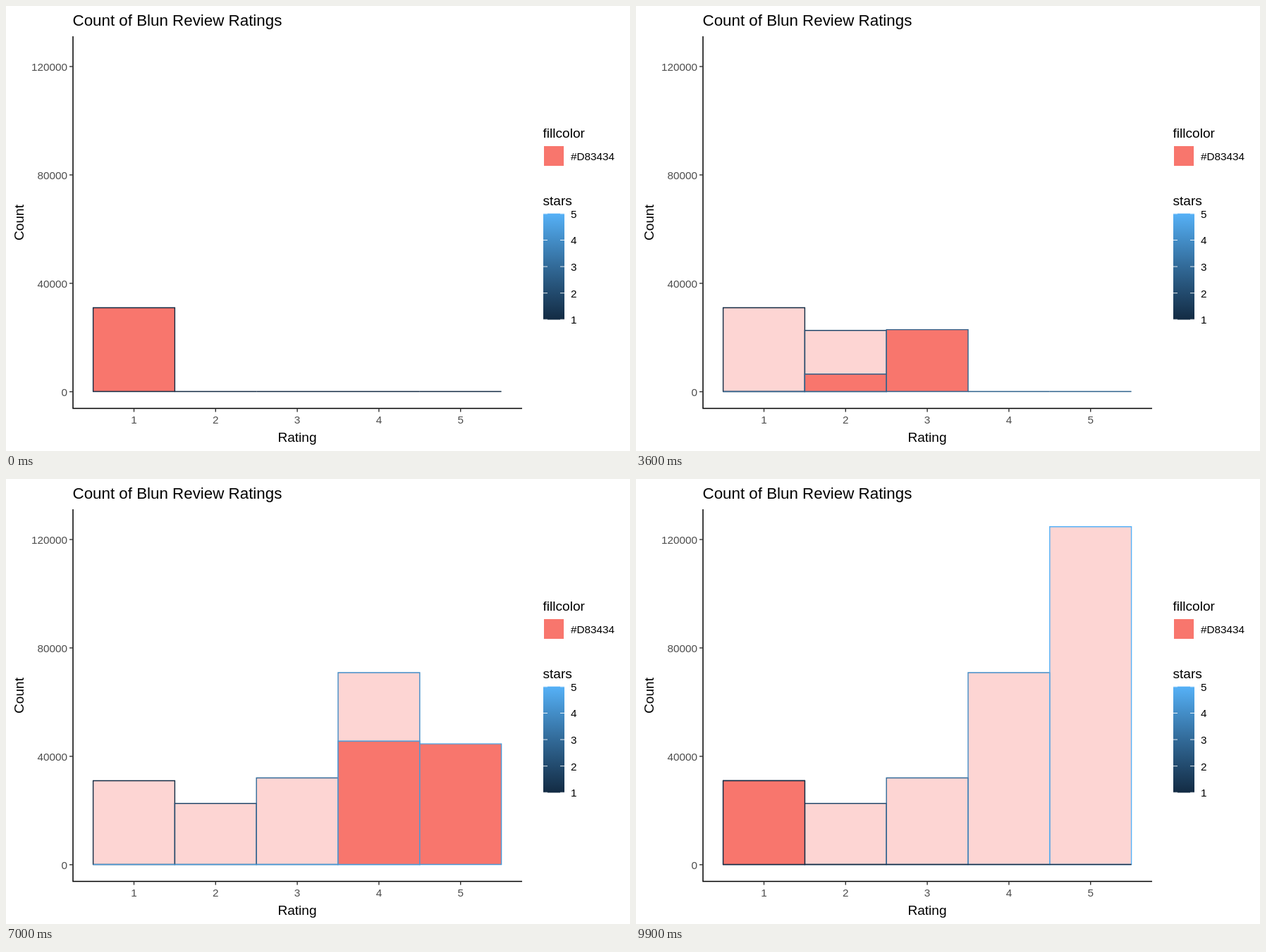
An HTML page that plays this animation: 885x632 px, repeating every 10 s.

```html
<!DOCTYPE html>
<html lang="en">
<head>
<meta charset="utf-8">
<title>Count of Review Ratings</title>
<style>
  html, body { margin: 0; width: 100%; height: 100%; overflow: hidden; background: #fff; }
  svg { display: block; font-family: "Liberation Sans", Arial, sans-serif; font-size: 15.3px; }
  .title { font-size: 22.35px; }
  .head { font-size: 19.1px; }
  .tick { fill: #4d4d4d; }
  .mid { text-anchor: middle; }
  .end { text-anchor: end; }
  .bar { stroke-width: 1.4; }
</style>
</head>
<body>
<svg width="885" height="632" viewBox="0 0 885 632">
  <defs>
    <linearGradient id="ramp" x1="0" y1="1" x2="0" y2="0"></linearGradient>
  </defs>
  <g id="bars"></g>
  <g id="axes">
    <path d="M95 43V571.5H732" fill="none" stroke="#000" stroke-width="1.5"/>
  </g>
  <text class="title" x="94.5" y="28">Count of Blun Review Ratings</text>
  <text class="head mid" x="413" y="618.5">Rating</text>
  <text class="head mid" transform="translate(25 307.5) rotate(-90)">Count</text>
  <g id="legend">
    <text class="head" x="761.5" y="187">fillcolor</text>
    <rect x="763" y="199" width="28" height="28" fill="#f8766d"/>
    <text x="801" y="219">#D83434</text>
    <text class="head" x="761.5" y="283">stars</text>
    <rect x="762" y="294.7" width="30" height="150.8" fill="url(#ramp)"/>
  </g>
</svg>
<script>
  const NS = "http://www.w3.org/2000/svg";
  const $ = id => document.getElementById(id);

  const LEFT = 123.6, STEP = 115.8, BASE = 547.5;
  const HEIGHTS = [119, 86.8, 123, 272.5, 479.8];
  const RAMP = [[19, 43, 67], [34, 74, 109], [50, 106, 152], [67, 141, 199], [86, 177, 247]];
  const HOLD = 6, MOVE = 14, CYCLE = HOLD + MOVE;
  const FRAME_MS = 100, FRAMES = 100;

  function add(parent, tag, attrs, text) {
    const el = document.createElementNS(NS, tag);
    for (const key in attrs) el.setAttribute(key, attrs[key]);
    if (text !== undefined) el.textContent = text;
    parent.appendChild(el);
    return el;
  }

  const lerp = (a, b, t) => a + (b - a) * t;

  // Colour for a star position from 0 (one star) to 4 (five stars).
  function starColor(pos) {
    const i = Math.min(3, Math.floor(pos));
    return `rgb(${RAMP[i].map((c, n) => Math.round(lerp(c, RAMP[i + 1][n], pos - i)))})`;
  }

  function barPath(i, height) {
    const x = LEFT + i * STEP;
    return `M${x} ${BASE}V${BASE - height}H${x + STEP}V${BASE}Z`;
  }

  function addBar(i, height, alpha) {
    return add($("bars"), "path", {
      class: "bar", d: barPath(i, height), fill: "#f8766d",
      "fill-opacity": alpha, stroke: starColor(i)
    });
  }

  // Axis ticks and labels
  for (let i = 0; i < 4; i++) {
    const y = BASE + 0.3 - i * 153.95;
    add($("axes"), "path", { d: `M90 ${y}H95`, stroke: "#333", "stroke-width": 1.4 });
    add($("axes"), "text", { class: "tick end", x: 87, y: y + 6 }, i * 40000);
  }
  for (let i = 0; i < 5; i++) {
    const x = LEFT + (i + 0.5) * STEP;
    add($("axes"), "path", { d: `M${x} 571.5V576.5`, stroke: "#333", "stroke-width": 1.4 });
    add($("axes"), "text", { class: "tick mid", x, y: 593 }, i + 1);
  }

  // Colour legend
  for (let i = 0; i < 5; i++) {
    const y = 445.3 - i * 37.6;
    add($("ramp"), "stop", { offset: i / 4, "stop-color": starColor(i) });
    add($("legend"), "path", { d: `M762 ${y}h6M786 ${y}h6`, stroke: "#fff", "stroke-width": 0.9 });
    add($("legend"), "text", { x: 801, y: y + 5.9 }, i + 1);
  }

  const shadows = HEIGHTS.map((h, i) => addBar(i, h, 0.3));
  const live = HEIGHTS.map((h, i) => addBar(i, 0, 1));

  function draw(frame) {
    // 101 tween steps fit into 100 frames, so one step is skipped midway.
    const step = frame + (frame >= FRAMES / 2 ? 1 : 0);
    const turn = Math.floor(step / CYCLE);
    const t = Math.max(0, step % CYCLE - HOLD) / MOVE;
    const from = turn % 5, to = (turn + 1) % 5;
    const color = starColor(lerp(from, to, t));

    shadows.forEach((bar, i) => {
      const past = turn > i || (turn === i && t > 0);
      bar.setAttribute("visibility", past ? "visible" : "hidden");
    });
    live.forEach((bar, i) => {
      const share = i === from ? 1 - t : i === to ? t : 0;
      bar.setAttribute("d", barPath(i, HEIGHTS[i] * share));
      bar.setAttribute("stroke", color);
    });
  }

  const start = performance.now();
  function tick() {
    draw(Math.floor((performance.now() - start) / FRAME_MS) % FRAMES);
    requestAnimationFrame(tick);
  }
  tick();
</script>
</body>
</html>
```
